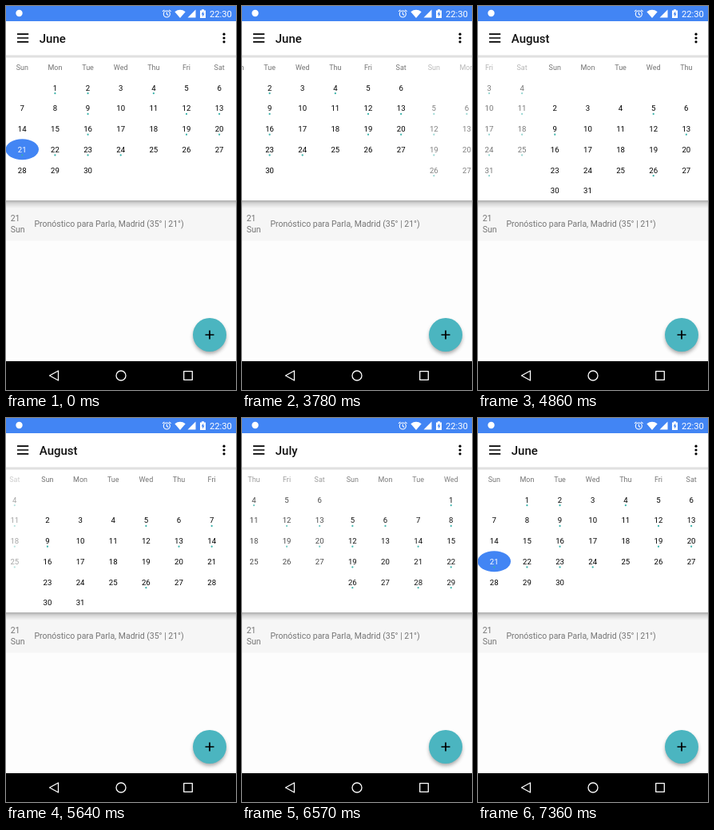
These frames come from a looping animation (288x480 px, 7440 ms). An HTML page:

```html
<!DOCTYPE html>
<html lang="en">
<head>
<meta charset="utf-8">
<title>Month calendar</title>
<style>
  html, body { margin: 0; width: 100%; height: 100%; overflow: hidden; background: #fff; }
  svg { display: block; width: 288px; height: 480px; font-family: Roboto, "Noto Sans", sans-serif; }
  .page { font-size: 9.6px; text-anchor: middle; }
  .week { font-size: 9px; fill: #757575; }
  .event { font-size: 10.5px; fill: #757575; }
</style>
</head>
<body>
<svg viewBox="0 0 288 480">
  <defs>
    <linearGradient id="shade" x2="0" y2="1">
      <stop stop-color="#000" stop-opacity=".3"/>
      <stop offset=".4" stop-color="#000" stop-opacity=".12"/>
      <stop offset="1" stop-color="#000" stop-opacity="0"/>
    </linearGradient>
    <filter id="blur" x="-30%" y="-30%" width="160%" height="160%"><feGaussianBlur stdDeviation="2.6"/></filter>
  </defs>

  <rect width="288" height="480" fill="#fff"/>
  <rect y="293" width="288" height="147" fill="#fdfdfd"/>

  <!-- agenda row -->
  <rect y="243" width="288" height="50.5" fill="#f6f6f6"/>
  <rect y="243" width="288" height="10" fill="url(#shade)"/>
  <g class="event">
    <text x="5.7" y="269">21</text>
    <text x="5.7" y="283">Sun</text>
    <text x="35.4" y="276">Pronóstico para Parla, Madrid (35° | 21°)</text>
  </g>

  <g id="pages"></g>

  <!-- app bar -->
  <rect y="61.5" width="288" height="3" fill="#e0e0e0"/>
  <path d="M14 35.2h14.2M14 40h14.2M14 44.8h14.2" stroke="#000" stroke-width="1.7"/>
  <text id="title" x="41.8" y="46" font-size="15" font-weight="500" fill="#111">June</text>
  <g><circle cx="273" cy="35.2" r="1.6"/><circle cx="273" cy="40" r="1.6"/><circle cx="273" cy="44.8" r="1.6"/></g>

  <!-- status bar -->
  <rect width="288" height="19" fill="#4285f4"/>
  <g fill="#fff">
    <circle cx="16.5" cy="9" r="4.2"/>
    <g fill="none" stroke="#fff" stroke-width="1.1">
      <circle cx="201.3" cy="10" r="4"/>
      <path d="M201.3 7.5v2.8l1.8 1.2M196 6.8l2.4-2M206.6 6.8l-2.4-2"/>
    </g>
    <path d="M211.3 7.2Q218 2.300 224.7 7.2L218 15Z"/>
    <path d="M237.500 4.500V14.500H227.500Z"/>
    <path d="M243 5.500h2v-1.200h3v1.200h2V15h-7Z"/>
    <path d="M247.200 6.600l-2.600 4h1.500v2.800l2.500-4h-1.400Z" fill="#4285f4"/>
    <text x="255" y="13.600" font-size="11.200">22:30</text>
  </g>

  <!-- add button -->
  <circle cx="255" cy="414" r="20.500" opacity=".35" filter="url(#blur)"/>
  <circle cx="255" cy="411" r="21" fill="#4bb5c0"/>
  <path d="M249.500 411h11M255 405.500v11" stroke="#000" stroke-width="1.700"/>

  <!-- navigation bar -->
  <rect y="444" width="288" height="36"/>
  <g fill="none" stroke="#fff" stroke-width="1.300" stroke-linejoin="round">
    <path d="M65.500 456v12l-11-6Z"/>
    <circle cx="144" cy="462" r="6"/>
    <rect x="222.700" y="456.700" width="10.600" height="10.600"/>
  </g>
</svg>
<script>
const WIDTH = 288, LOOP = 7440, COL = WIDTH / 7;
const weekdays = ['Sun', 'Mon', 'Tue', 'Wed', 'Thu', 'Fri', 'Sat'];
const months = [
  { name: 'June', first: 1, days: 30, selected: 21, marked: [1, 2, 4, 9, 12, 13, 16, 19, 20, 21, 22, 23, 24] },
  { name: 'July', first: 3, days: 31, marked: [1, 3, 4, 5, 6, 8, 11, 12, 14, 17, 18, 19, 22, 24, 25, 26, 28, 29, 31] },
  { name: 'August', first: 6, days: 31, marked: [5, 7, 9, 13, 14, 26] }
];
// jump: share of the way already covered when the swipe becomes visible
const swipes = [
  { start: 3780, from: 0, to: 1, jump: 0.236, steps: 6 },
  { start: 4710, from: 1, to: 2, jump: 0.276, steps: 7 },
  { start: 5640, from: 2, to: 1, jump: 0.11, steps: 7 },
  { start: 6570, from: 1, to: 0, jump: 0.41, steps: 7 }
];

const colX = c => (c + 0.5) * COL - 0.3;
const label = (x, y, text, attrs = '') => `<text x="${x}" y="${y}" ${attrs}>${text}</text>`;

function monthMarkup({ first, days, selected, marked }) {
  let out = weekdays.map((d, c) => label(colX(c), 80, d, 'class="week"')).join('');
  for (let day = 1; day <= days; day++) {
    const cell = first + day - 1, x = colX(cell % 7);
    const y = 102.2 + 25.75 * Math.floor(cell / 7);
    const on = day === selected;
    if (on) out += `<ellipse cx="${x}" cy="${y - 0.2}" rx="20.7" ry="13" fill="#4285f4"/>`;
    out += label(x, y + 3.4, day, on ? 'fill="#fff"' : '');
    if (marked.includes(day)) out += `<circle cx="${x}" cy="${y + 7}" r="1.1" fill="#35b0a7"/>`;
  }
  return `<g class="page">${out}</g>`;
}

const pagesBox = document.getElementById('pages');
const title = document.getElementById('title');
pagesBox.innerHTML = months.map(monthMarkup).join('');
const pages = [...pagesBox.children];

function scrollAt(t) {
  let pos = 0;
  for (const { start, from, to, jump, steps } of swipes) {
    if (t < start) break;
    const step = Math.min(steps, Math.max(0, Math.floor((t - start - 10) / 70)));
    const done = 1 - (1 - jump) * (1 - step / steps) ** 3;
    pos = from + (to - from) * done;
  }
  return pos;
}

function draw(t) {
  const pos = scrollAt(t);
  pages.forEach((page, i) => {
    const off = i - pos, far = Math.abs(off);
    page.setAttribute('transform', `translate(${off * WIDTH} 0)`);
    page.setAttribute('opacity', Math.min(1, 1.42 - 1.2 * far));
    page.setAttribute('visibility', far < 1 ? 'visible' : 'hidden');
  });
  title.textContent = months[Math.round(pos)].name;
}

const begin = performance.now();
function tick() {
  draw((performance.now() - begin) % LOOP);
  requestAnimationFrame(tick);
}
tick();
</script>
</body>
</html>
```
